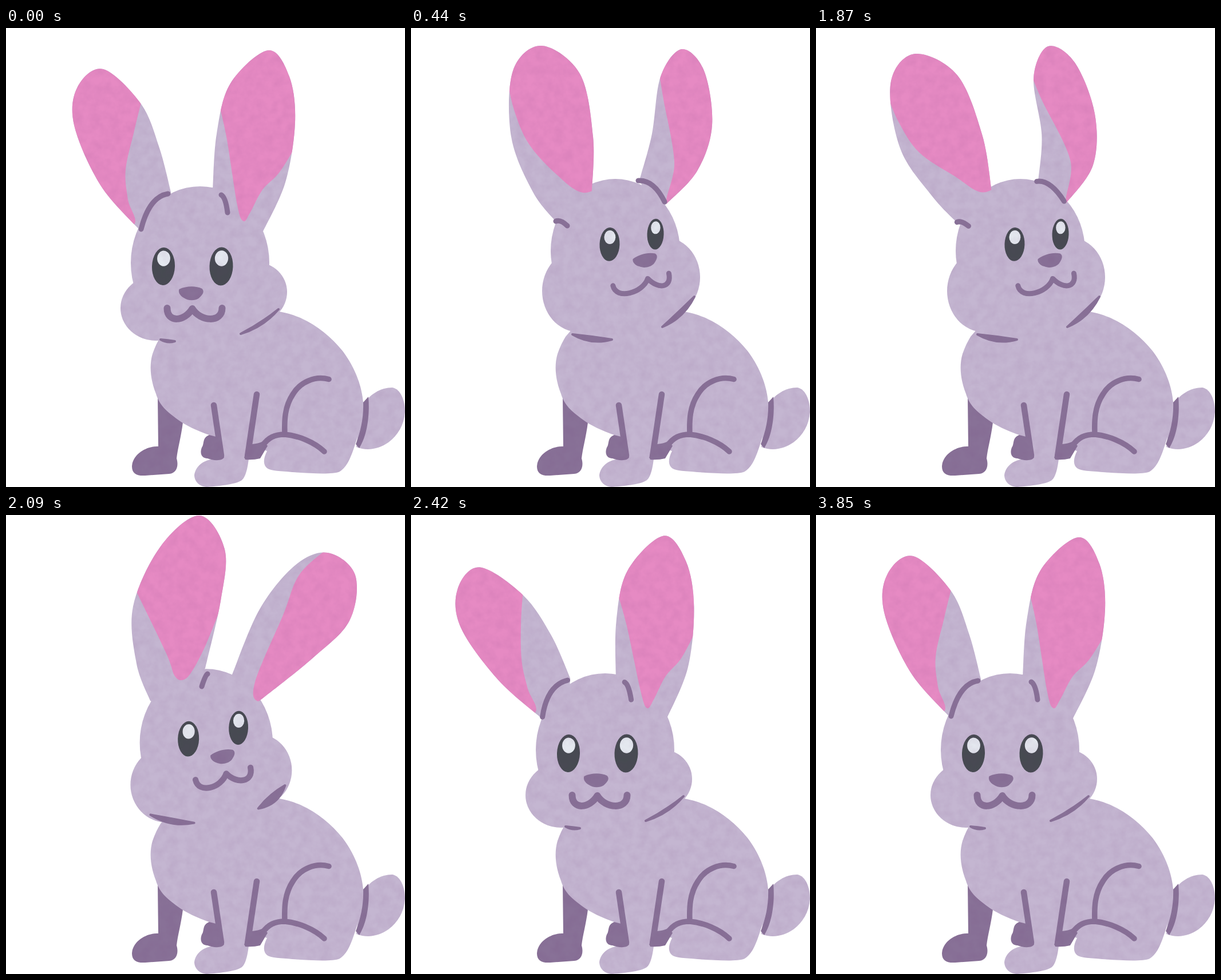
Animation, 697 px wide and 803 px high, one loop 3.96 s. Source, as an HTML page:

```html
<!DOCTYPE html>
<html lang="en">
<head>
<meta charset="utf-8">
<title>Rabbit</title>
<style>
html, body { margin: 0; width: 100%; height: 100%; overflow: hidden; background: #fff; }
svg { display: block; width: 697px; height: 803px; }
.fur { fill: #c4b6d1; }
.dark { fill: #887197; }
.pink { fill: #e68ac3; }
.eye { fill: #464a51; }
.shine { fill: #e4e8ef; }
.line { fill: none; stroke: #887197; stroke-linecap: round; stroke-linejoin: round; }
.crease { fill: #887197; stroke: #887197; stroke-width: 4; stroke-linejoin: round; }
</style>
</head>
<body>
<svg viewBox="0 0 697 803" xmlns="http://www.w3.org/2000/svg">
  <defs>
    <filter id="paper" filterUnits="userSpaceOnUse" x="0" y="0" width="697" height="803" color-interpolation-filters="sRGB">
      <feTurbulence id="grain" type="fractalNoise" baseFrequency=".06" numOctaves="4" seed="1" result="n"/>
      <feColorMatrix in="n" values="0 0 0 0 .42  0 0 0 0 .2  0 0 0 0 .45  .14 0 0 0 -.04" result="tint"/>
      <feComposite in="tint" in2="SourceGraphic" operator="atop"/>
    </filter>
    <clipPath id="clipL"><path id="edgeL"/></clipPath>
    <clipPath id="clipR"><path id="edgeR"/></clipPath>
  </defs>
  <g filter="url(#paper)">
    <path class="fur" d="M620 665C634 640 655 629 675 629C690 632 697 652 697 672C695 695 685 712 668 725C652 736 632 741 612 733Z"/>
    <path class="dark" d="M265 646L266 732C245 731 221 746 220 767C220 779 228 784 243 783L285 780C298 779 302 766 298 753C300 735 306 715 309 690L285 665Z"/>
    <path class="fur" d="M477 496C520 503 560 530 588 565C612 597 622 630 624 655C624 690 616 710 610 728C603 750 596 768 583 776C570 782 530 779 500 777C480 775 463 775 456 770C449 764 449 754 456 740L440 735L424 754C422 770 419 784 413 790C405 798 375 801 352 803C338 803 329 793 329 782C331 768 342 757 362 754L380 750L355 712C335 705 313 695 300 685C280 670 268 660 262 640C252 615 250 590 256 570C260 558 265 548 270 540L330 470L440 470Z"/>
    <path class="dark" d="M355 712C342 717 347 728 342 734C338 745 342 753 352 753C362 757 378 758 381 751L371 716ZM416 751L430 728Q442 727 449 723L457 731L444 753Q432 756 418 755ZM633 645C636 680 630 715 617 735L611 728C620 705 625 680 624 655Z"/>
    <path class="line" stroke-width="10.5" d="M363 660L376 748M438 641L422 749"/>
    <path class="line" stroke-width="9.5" d="M448 731C458 716 470 711 487 711C510 713 538 724 556 741M564 614.500C540 608 514 619 501 641C487 662 486 686 487 711"/>
    <ellipse id="skull" class="fur"/>
    <ellipse id="cheekL" class="fur"/>
    <ellipse id="cheekR" class="fur"/>
    <path id="earL" class="fur"/>
    <path id="earR" class="fur"/>
    <path id="pinkL" class="pink" clip-path="url(#clipL)"/>
    <path id="pinkR" class="pink" clip-path="url(#clipR)"/>
    <path id="foldL" class="line" stroke-width="9"/>
    <path id="foldR" class="line" stroke-width="9"/>
    <path id="creaseL" class="crease"/>
    <path id="creaseR" class="crease"/>
    <g id="face">
      <ellipse id="eyeL" class="eye"/>
      <ellipse id="eyeR" class="eye"/>
      <ellipse id="shineL" class="shine"/>
      <ellipse id="shineR" class="shine"/>
      <path id="nose" class="dark" d="M-21 -7C-8 -13 8 -13 19 -8C24 -3 20 3 13 9C5 14 -6 13 -13 8C-20 4 -23 -2 -21 -7Z"/>
      <path id="mouth" class="line"/>
    </g>
  </g>
</svg>
<script>
const STEP = 110, COUNT = 36;
const $ = id => document.getElementById(id);
const set = (id, attrs) => { for (const k in attrs) $(id).setAttribute(k, attrs[k]); };
const lerp = (a, b, k) => a + (b - a) * k;
const mix = (a, b, k) => a.map((v, i) => lerp(v, b[i], k));
const points = s => s.split(' ').map(p => p.split(',').map(Number));

// Head parts looking ahead and looking up: cx, cy, rx, ry; creases: two ends and thickness
const ahead = {
  skull: [339, 411, 121, 134], cheekL: [262, 490, 62, 57], cheekR: [438, 462, 53, 52],
  creaseL: [270, 545, 295, 548, 3], creaseR: [410, 535, 476, 492, 4]
};
const above = {
  skull: [357, 390, 113, 126], cheekL: [293, 460, 64, 72], cheekR: [440, 436, 65, 71],
  creaseL: [282, 536, 351, 545, 8], creaseR: [439, 523, 495, 470, 7]
};
// How far the creases move when the neck is half turned
const sway = { creaseL: [-26, -16, 0, -8, 2], creaseR: [14, -15, 0, -6, 7] };

// Ear drawings by head turn. Outlines run from root over the tip (4th point) to root.
const ears = {
  rest: {
    turn: 0,
    L: {
      edge: '288,287 268,210 236,133 170,72 125,103 119,170 165,275 234,354',
      pink: '240,115 224,180 209,248 213,300 222,345 140,345', fold: '283,290 236,352'
    },
    R: {
      edge: '361,283 368,185 392,97 458,39 495,85 505,165 488,270 448,358',
      pink: '370,125 385,190 404,310 415,338 427,322 448,283 478,252 510,200', fold: '376,292 387,323'
    }
  },
  alert: {
    turn: 1,
    L: {
      edge: '316,284 318,190 295,80 228,31 178,75 175,190 213,287 256,342',
      pink: '165,75 180,143 206,203 254,256 300,288 345,270', fold: '253,338 273,346'
    },
    R: {
      edge: '400,263 421,185 436,85 473,37 512,75 526,170 500,250 446,308',
      pink: '432,70 441,125 460,235 447,310 500,300', fold: '397,267 443,304'
    }
  },
  trail: {
    turn: .6,
    L: {
      edge: '348,268 375,150 382,60 338,1 270,55 222,160 228,260 252,325',
      pink: '222,122 279,240 295,282 311,288 327,270 350,225 376,160', fold: '352,278 342,300'
    },
    R: {
      edge: '395,279 443,165 505,88 562,66 610,105 600,185 535,251 443,325',
      pink: '562,58 512,105 484,175 435,292 443,327 500,310', fold: ''
    }
  }
};

// Key steps, blended in between: step, ears, head turn, swing of left and right ear
const keys = [
  [0, 'rest', 0, 0, 0], [1, 'rest', .6, -42, -32], [2, 'alert', 1, -22, -24],
  [3, 'alert', 1, 8, 8], [4, 'alert', 1, 0, 0], [5, 'alert', 1, 0, 0],
  [7, 'alert', 1, -10, -13], [11, 'alert', 1, 0, 0], [15, 'alert', 1, 0, 0],
  [17, 'alert', 1, -10, -13], [18, 'alert', 1, 4, 4], [19, 'trail', .6, 0, 0],
  [20, 'rest', 0, -17, -8], [21, 'rest', 0, -26, -12], [22, 'rest', 0, -10, -3],
  [24, 'rest', 0, 0, 0], [COUNT, 'rest', 0, 0, 0]
];

// Smooth open curve through the points
function curve(p) {
  const at = i => p[Math.max(0, Math.min(p.length - 1, i))];
  let d = 'M' + p[0];
  for (let i = 0; i < p.length - 1; i++) {
    const [a, b, c, e] = [at(i - 1), at(i), at(i + 1), at(i + 2)];
    d += `C${b.map((v, j) => v + (c[j] - a[j]) / 6)} ${c.map((v, j) => v - (e[j] - b[j]) / 6)} ${c}`;
  }
  return d;
}

function ear(side, drawing, deg, shift) {
  const art = drawing[side], raw = points(art.edge);
  const root = mix(raw[0], raw[7], .5);
  // The ear bends more towards the tip and its root slides along the skull
  const swing = ([px, py]) => {
    const x = px - root[0], y = py - root[1];
    const a = deg * Math.min(1, Math.hypot(x, y) / 140) * Math.PI / 180;
    return [root[0] + shift[0] + .8 * deg + x * Math.cos(a) - y * Math.sin(a),
            root[1] + shift[1] + x * Math.sin(a) + y * Math.cos(a)];
  };
  const edge = raw.map(swing), tip = edge[3], base = swing(root);
  const outline = curve(edge) + `L${mix(tip, base, 1.16)}Z`;
  set('ear' + side, { d: outline });
  set('edge' + side, { d: outline });

  // The patch closes well outside the ear and is clipped by it
  const pink = points(art.pink).map(swing), middle = mix(base, tip, .5);
  const far = p => mix(middle, p, 3);
  set('pink' + side, { d: curve(pink) + `L${far(pink[pink.length - 1])}L${far(tip)}L${far(pink[0])}Z` });

  let fold = '';
  if (art.fold) {
    const [a, b] = points(art.fold).map(swing), m = mix(a, b, .5);
    const bow = .35 * Math.hypot(b[0] - a[0], b[1] - a[1]) / Math.hypot(tip[0] - base[0], tip[1] - base[1]);
    fold = `M${a}Q${m.map((v, i) => v + (tip[i] - base[i]) * bow)} ${b}`;
  }
  set('fold' + side, { d: fold });
}

// A curved sliver that is thickest in the middle
function crease(id, [x1, y1, x2, y2, thick]) {
  const dx = x2 - x1, dy = y2 - y1, len = Math.hypot(dx, dy);
  const side = off => [(x1 + x2) / 2 - dy / len * off, (y1 + y2) / 2 + dx / len * off];
  const bow = .1 * len;
  set(id, { d: `M${x1} ${y1}Q${side(bow + thick)} ${x2} ${y2}Q${side(bow - thick)} ${x1} ${y1}Z` });
}

function head(turn) {
  for (const id of ['skull', 'cheekL', 'cheekR']) {
    const [cx, cy, rx, ry] = mix(ahead[id], above[id], turn);
    set(id, { cx, cy, rx, ry });
  }
  const half = Math.sin(Math.PI * turn);
  for (const id of ['creaseL', 'creaseR'])
    crease(id, mix(ahead[id], above[id], turn).map((v, i) => v + sway[id][i] * half));

  const roll = -12.5 * Math.min(1, 1.7 * turn);
  set('face', { transform: `translate(${lerp(325.5, 387, turn)} ${lerp(417, 369.5, turn ** .6)}) rotate(${roll})` });
  const gap = lerp(50.5, 41, turn);
  for (const [s, x, rx, ry] of [['L', -gap, lerp(20, 17.5, turn), lerp(33, 29.5, turn)],
                                ['R', gap, lerp(20.5, 14.5, turn), lerp(33.5, 27, turn)]]) {
    const transform = `translate(${x} 0) rotate(${2 - roll})`;
    set('eye' + s, { rx, ry, transform });
    set('shine' + s, { cy: -.42 * ry, rx: .57 * rx, ry: .41 * ry, transform });
  }
  set('nose', { transform: `translate(${lerp(-2, 14, turn)} ${lerp(47, 41, turn)})` });
  const l = lerp(44, 62, turn), r = lerp(52, 38, turn);
  set('mouth', {
    d: `M${-l} -1C${-l} 25 -14 23 0 0C14 23 ${r} 25 ${r} -1`,
    transform: `translate(${lerp(0, 11, turn)} ${lerp(74, 73, turn)})`,
    'stroke-width': lerp(12, 9, turn)
  });
}

function draw(tick) {
  const i = keys.findIndex((k, n) => tick < keys[n + 1][0]);
  const [t0, name, ...from] = keys[i], [t1, , ...to] = keys[i + 1];
  const [turn, left, right] = mix(from, to, (tick - t0) / (t1 - t0));
  const drawing = ears[name];
  const now = mix(ahead.skull, above.skull, turn), own = mix(ahead.skull, above.skull, drawing.turn);
  const shift = now.map((v, j) => v - own[j]);
  head(turn);
  ear('L', drawing, left, shift);
  ear('R', drawing, right, shift);
  // Fresh paper grain on each drawing; one is held for two steps
  set('grain', { seed: 1 + (tick === 5 ? 4 : tick) * 7 });
}

let shown = -1;
function run() {
  const tick = Math.floor(performance.now() / STEP) % COUNT;
  if (tick !== shown) draw(shown = tick);
  requestAnimationFrame(run);
}
run();
</script>
</body>
</html>
```
